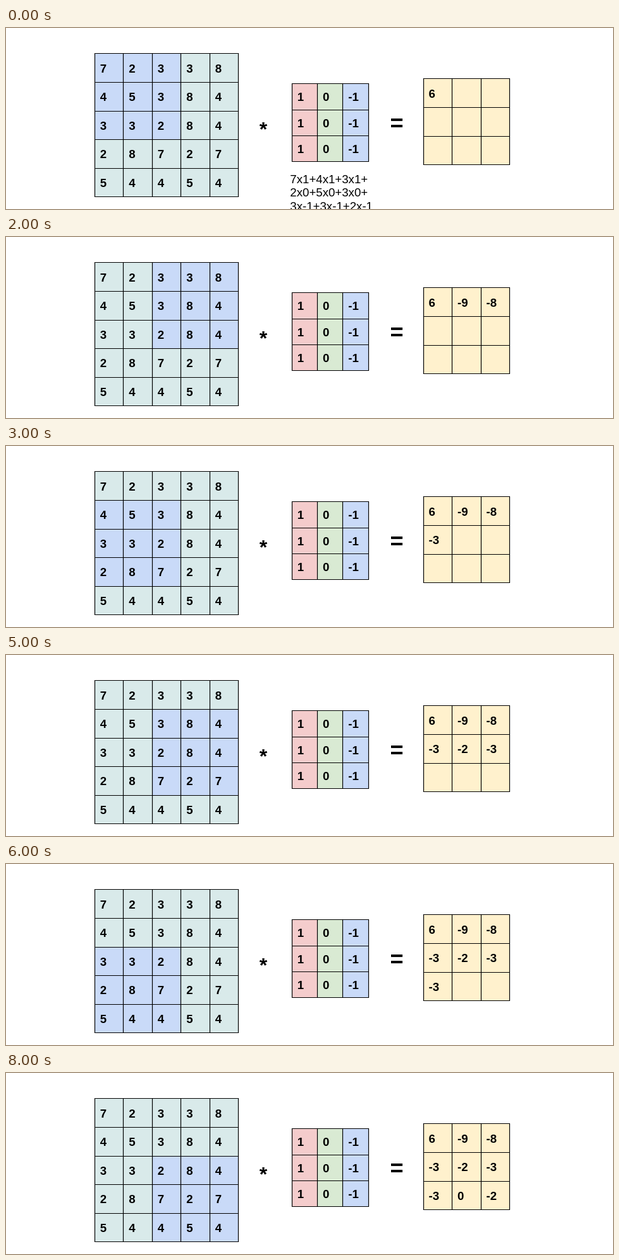
Animation of 960x288 px, one loop 9 s. Source, as an HTML page:

```html
<!DOCTYPE html>
<html lang="en">
<head>
<meta charset="utf-8">
<title>Convolution of a 5x5 matrix with a 3x3 kernel</title>
<style>
  html, body { margin: 0; width: 100%; height: 100%; overflow: hidden; background: #fff; }
  svg { display: block; }
  text { font-family: "Liberation Sans", Arial, sans-serif; font-size: 18.67px; }
  .bold text, .sign { font-weight: bold; }
  .sign { text-anchor: middle; }
  .line { stroke: #000; stroke-width: 1.2; }
</style>
</head>
<body>
<svg id="stage" width="960" height="288" viewBox="0 0 960 288">
  <text class="sign" x="407" y="171.5" style="font-size:32px">*</text>
  <text class="sign" x="618" y="163.5" style="font-size:36px">=</text>
</svg>
<script>
const STEP = 1000, SIZE = 3;
const TEAL = '#d9eaea', BLUE = '#c9daf8', YELLOW = '#fff1cd';
const KERNEL_COLORS = ['#f4cccc', '#d9ead3', BLUE];
const input = ['72338', '45384', '33284', '28727', '54454'].map(row => [...row].map(Number));
const kernel = [[1, 0, -1], [1, 0, -1], [1, 0, -1]];
const stage = document.getElementById('stage');

function add(parent, tag, attrs, content = '') {
  const el = document.createElementNS('http://www.w3.org/2000/svg', tag);
  for (const key in attrs) el.setAttribute(key, attrs[key]);
  el.textContent = content;
  parent.append(el);
  return el;
}

// Builds a matrix and returns its cells, row by row
function grid(values, x, y, w, h, baseline, color) {
  const g = add(stage, 'g', { class: 'bold' });
  const n = values.length;
  const px = i => Math.round(x + w * i) + 0.5;
  const py = i => Math.round(y + h * i) + 0.5;
  const cells = values.map((row, r) => row.map((value, c) => ({
    box: add(g, 'rect', {
      x: px(c), y: py(r), width: px(c + 1) - px(c), height: py(r + 1) - py(r), fill: color(c)
    }),
    label: add(g, 'text', { x: x + w * c + 8.8, y: y + h * r + baseline }, value)
  })));
  for (let i = 0; i <= n; i++) {
    add(g, 'line', { class: 'line', x1: px(i), x2: px(i), y1: py(0) - 0.5, y2: py(n) + 0.5 });
    add(g, 'line', { class: 'line', x1: px(0) - 0.5, x2: px(n) + 0.5, y1: py(i), y2: py(i) });
  }
  return cells;
}

function convolve(r, c) {
  return kernel.reduce((sum, row, i) =>
    sum + row.reduce((s, k, j) => s + k * input[r + i][c + j], 0), 0);
}

// One line of products for each kernel column
function products(c) {
  return kernel[0].map((_, j) =>
    kernel.map((row, i) => `${input[i][c + j]}x${row[j]}`).join('+') + (j < SIZE - 1 ? '+' : ''));
}

const output = kernel.map((row, r) => row.map((_, c) => convolve(r, c)));
const inputCells = grid(input, 139.9, 40.4, 45.5, 45.6, 30.2, () => TEAL);
grid(kernel, 452, 88.4, 40.2, 41.3, 28, c => KERNEL_COLORS[c]);
const outputCells = grid(output, 659.8, 80.4, 45.5, 45.6, 30.2, () => YELLOW);
const sums = [0, 1, 2].map(i => add(stage, 'text', { x: 449.3, y: 246.6 + 21.8 * i }));

function show(step) {
  const top = Math.floor(step / SIZE), left = step % SIZE;
  const inside = (v, from) => v >= from && v < from + SIZE;
  inputCells.forEach((row, r) => row.forEach((cell, c) =>
    cell.box.setAttribute('fill', inside(r, top) && inside(c, left) ? BLUE : TEAL)));
  outputCells.flat().forEach((cell, i) =>
    cell.label.setAttribute('visibility', i <= step ? 'visible' : 'hidden'));
  const lines = step < 2 ? products(step) : [];
  sums.forEach((el, i) => { el.textContent = lines[i] || ''; });
}

const start = performance.now();
let shown = -1;
function tick() {
  const step = Math.floor((performance.now() - start) / STEP) % (SIZE * SIZE);
  if (step !== shown) show(shown = step);
  requestAnimationFrame(tick);
}
tick();
</script>
</body>
</html>
```
